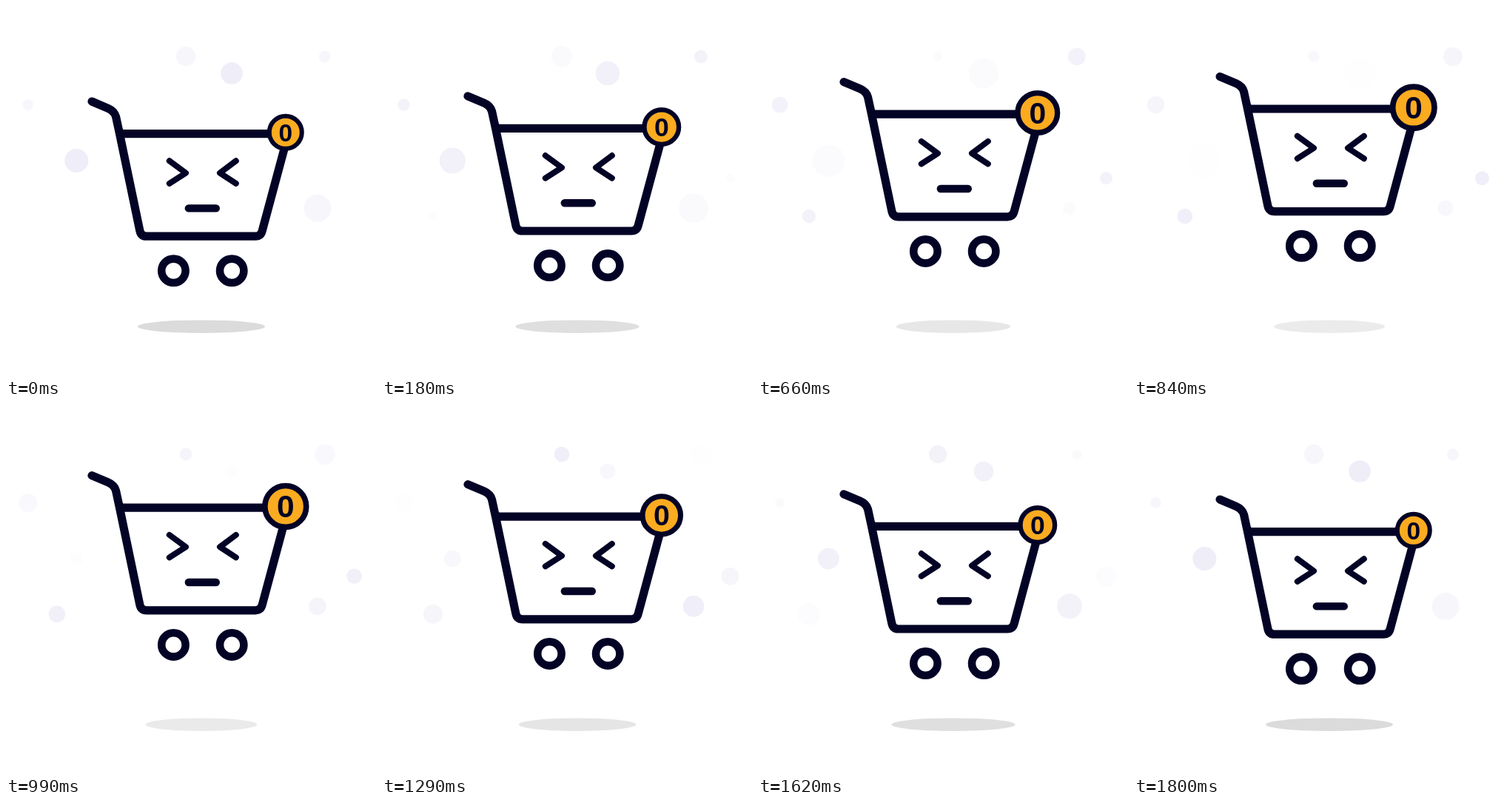
An HTML page for the animation above (1.95 s loop, 500 px wide and 500 px high).

```html
<!DOCTYPE html>
<html lang="en">
<head>
<meta charset="utf-8">
<title>Empty cart</title>
<style>
  html, body { margin: 0; width: 100%; height: 100%; overflow: hidden; background: #fff; }
  svg { display: block; width: 100%; height: 100%; }
  .line { fill: none; stroke: #030326; stroke-linecap: round; stroke-linejoin: round; }
  .body { stroke-width: 11.2; }
  .eye { stroke-width: 8; }
  .badge { fill: #fbab1f; stroke: #030326; stroke-width: 6; }
  .count { font: 700 33.5px "Liberation Sans", Arial, sans-serif; text-anchor: middle; fill: #030326; }
  .dot { fill: #efedf7; }
</style>
</head>
<body>
<svg viewBox="0 0 500 500">
  <g id="dots"></g>
  <ellipse id="shadow" cx="264" cy="433.2" rx="86" ry="8.8"/>
  <g id="cart">
    <path class="line body" d="M116 129 L138 138.3 Q146.5 142 148.5 149.5 L153.5 172.6 L180.8 303.5 Q182.4 311.2 190 311.2 L337 311.2 Q344.5 311.2 346.3 303.5 L381.5 172.6 L158 172.6 Q153.8 172.6 152.8 168"/>
    <circle class="line body" style="stroke-width:10.6" cx="226.4" cy="357.8" r="16.2"/>
    <circle class="line body" style="stroke-width:10.6" cx="305.2" cy="357.8" r="16.2"/>
    <path class="line eye" d="M220.8 209.3 L243 225.6 L220.8 239.8 M310.8 209.3 L289 225.6 L310.8 239.8"/>
    <path class="line" stroke-width="10.4" d="M246.8 273.4 H283.8"/>
    <g id="badge">
      <circle class="badge" r="22"/>
      <text class="count" y="11.8">0</text>
    </g>
  </g>
</svg>
<script>
  const LOOP = 1950, CYCLE = 1800, TICK = 30;
  const $ = id => document.getElementById(id);

  // x, y, smallest radius, start of growth as a fraction of the cycle
  const dots = [
    [243, 68, 5.3, 0.25], [421, 273.3, 7.4, 0.25],
    [305, 91, 7.4, 0.5], [95.3, 209, 8, 0.5],
    [430.8, 68.3, 5.3, 0.75], [29.5, 133.5, 4.85, 0.75],
    [68.8, 284, 5.35, 0], [470.5, 232.8, 4.9, 0]
  ].map(([x, y, r, start]) => {
    const el = document.createElementNS("http://www.w3.org/2000/svg", "circle");
    el.setAttribute("class", "dot");
    el.setAttribute("cx", x);
    el.setAttribute("cy", y);
    $("dots").append(el);
    return { el, r, start };
  });

  const triangle = p => 1 - Math.abs(2 * p - 1);

  function draw(ms) {
    const t = Math.min(Math.floor((ms % LOOP) / TICK) * TICK, CYCLE) / CYCLE;
    const lift = triangle(t);

    $("cart").setAttribute("transform", `translate(0 ${-36 * lift})`);
    $("badge").setAttribute("transform", `translate(377.8 170.8) scale(${1 + 0.3 * lift})`);
    $("shadow").setAttribute("rx", 86 - 11.8 * lift);
    $("shadow").setAttribute("opacity", 0.14 - 0.065 * lift);

    for (const { el, r, start } of dots) {
      const p = (t - start + 1) % 1;
      el.setAttribute("r", r * (1 + 2 * p));
      el.setAttribute("opacity", triangle(p));
    }
  }

  const begin = performance.now();
  function loop() {
    draw(performance.now() - begin);
    requestAnimationFrame(loop);
  }
  loop();
</script>
</body>
</html>
```
